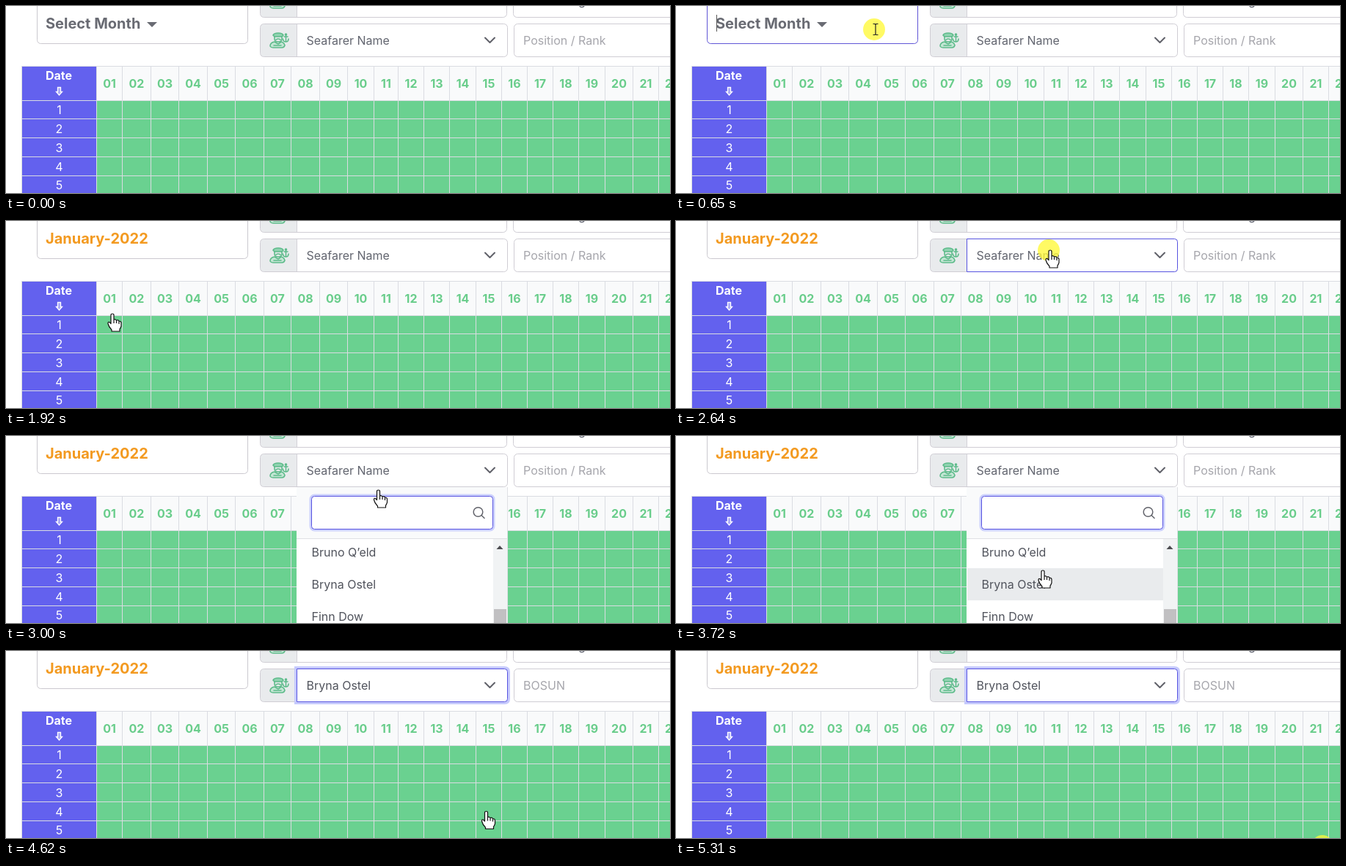
These frames come from a looping animation (905x256 px, 5.41 s). An HTML page:

```html
<!DOCTYPE html>
<html lang="en">
<head>
<meta charset="utf-8">
<title>Crew rest hours</title>
<style>
  html, body { margin: 0; width: 100%; height: 100%; overflow: hidden; background: #fff; }
  svg { display: block; width: 905px; height: 256px; font: 16px Inter, "Open Sans", sans-serif; }
  .b { font-weight: 700; }
  .h { font-weight: 700; font-size: 20px; }
  .mid { text-anchor: middle; }
  .line { fill: none; stroke-linecap: round; stroke-linejoin: round; }
</style>
</head>
<body>
<svg id="stage" viewBox="0 0 905 256">
  <defs>
    <g id="sailor" class="line" stroke="#5dbb8a" stroke-width="1.6">
      <path d="M5 4 Q6 1 12 1 Q18 1 19 4 L17 6 H7 Z" fill="#8fd3b0"/>
      <path d="M7 6 V9 Q7 13 12 13 Q17 13 17 9 V6 M9 10 Q12 8 15 10"/>
      <path d="M1 19 Q1 14 7 13 L12 16 L16 13 Q20 14 21 18 Q20 21 17 21 H5 Q2 21 1 19 Z M6 18 H16" fill="#c4e6d5"/>
      <path d="M22.500 4 V13 M20 6 H25 M18.500 9 Q18.500 13 22.500 13 Q26 13 26 9"/>
      <circle cx="22.500" cy="3" r="1"/>
    </g>
    <path id="chevron" class="line" d="M0 0 L6.500 6.500 L13 0" stroke="#5f6068" stroke-width="2"/>
    <path id="inputBox" d="M396.500 24.500 H679.500 Q683.500 24.500 683.500 28.500 V65.500 Q683.500 69.500 679.500 69.500 H396.500 Z"/>
  </defs>

  <rect id="monthBox" x="42.500" y="-30.500" width="287" height="82" rx="5" fill="#fff"/>
  <g id="pick">
    <text class="h" x="54" y="31" fill="#696b73">Select Month</text>
    <path d="M192 22 H206 L199 29 Z" fill="#696b73"/>
  </g>
  <text id="month" class="h" x="54" y="31" fill="#f39a20">January-2022</text>
  <rect id="caret" x="55" y="12" width="1" height="23" fill="#555"/>

  <g id="fields"></g>
  <use id="ring" href="#inputBox" fill="none" stroke="#c6cafc"/>
  <use id="focus" href="#inputBox" fill="#fff" stroke="#5753e0"/>
  <text id="seafarer" x="409.500" y="53"></text>
  <text id="rank" x="705" y="53" fill="#a6a6ac"></text>
  <use href="#chevron" x="653" y="43.500"/>

  <g id="table"></g>

  <g id="menu">
    <rect x="396" y="70" width="288" height="186" fill="#fff"/>
    <rect x="396" y="70" width="288" height="70" fill="#f9fafb"/>
    <path d="M683.500 70 V256 M396 140.500 H684" stroke="#dfe0e4" fill="none"/>
    <rect x="416.500" y="82.500" width="247" height="45" rx="4" fill="#fff" stroke="#ccd1fc" stroke-width="6"/>
    <rect x="416.500" y="82.500" width="247" height="45" rx="4" fill="#fff" stroke="#5753e0"/>
    <g class="line" stroke="#62636b" stroke-width="1.500">
      <circle cx="643.500" cy="104" r="6.300"/>
      <path d="M648 108.500 L652 112.500"/>
    </g>
    <rect id="hover" x="397" width="267" height="44" fill="#e9ebed"/>
    <g id="names" fill="#50535c"></g>
    <rect x="664" y="141" width="19" height="115" fill="#f1f3f4"/>
    <path d="M668.500 155 L673 150 L677.500 155 Z" fill="#4c4c50"/>
    <rect x="665" y="237" width="17" height="19" fill="#c1c0c2"/>
  </g>

  <circle id="halo" r="15" fill="#fff838" fill-opacity=".78"/>
  <path id="hand" d="M-2 2 Q-2 0 0 0 Q2 0 2 2 V8 Q4 7 5.500 9 Q8 8 9 10 Q12 10 12 12.500 V17 Q11 20 10 21 V24 H-1 V22 Q-5 18 -6 13.500 Q-6 10.500 -4 11.500 L-2 13.500 Z M2 8 V13 M5.500 9 V13 M9 10 V14" fill="#fff" stroke="#111" stroke-width="1.200" stroke-linejoin="round"/>
  <path id="beam" d="M-3.500 -7.500 H-1 L0 -6.500 L1 -7.500 H3.500 M0 -6.500 V6.500 M-3.500 7.500 H-1 L0 6.500 L1 7.500 H3.500" fill="none" stroke="#222" stroke-width="1.200"/>
</svg>

<script>
const LOOP = 5410;
const $ = id => document.getElementById(id);
const show = (id, on) => { $(id).style.display = on ? "" : "none"; };

function add(parent, tag, attrs, text = "") {
  const el = document.createElementNS("http://www.w3.org/2000/svg", tag);
  for (const key in attrs) el.setAttribute(key, attrs[key]);
  el.textContent = text;
  return $(parent).appendChild(el);
}
const rect = (parent, x, y, width, height, fill) =>
  add(parent, "rect", { x, y, width, height, fill });

// Form fields
function field(x, y, w, withIcon) {
  const box = { x: x + .5, y: y + .5, width: w, height: 45, rx: 5 };
  add("fields", "rect", { ...box, fill: "#fff" });
  if (withIcon) {
    add("fields", "path", {
      d: `M${x + 50} ${y + 1} H${x + 5} Q${x + 1} ${y + 1} ${x + 1} ${y + 5} V${y + 41} Q${x + 1} ${y + 45} ${x + 5} ${y + 45} H${x + 50} Z`,
      fill: "#e9ebed"
    });
    rect("fields", x + 50, y, 1, 45, "#d3d1d8");
    add("fields", "use", { href: "#sailor", x: x + 13, y: y + 12 });
  }
  add("fields", "rect", { ...box, fill: "none", stroke: "#cfcdd4" });
}
field(346, -30, 336, true);
field(691, -30, 300);
field(346, 24, 337, true);
field(692, 24, 300);
add("fields", "text", { x: 780, y: -1, fill: "#5f6370" }, "g");

// Date grid
const cols = [123, 158, 197, 235, 274, 312, 351, 388, 427, 465, 501, 534,
  569, 604, 640, 675, 710, 745, 780, 816, 854, 889, 926];
const rows = [129, 154, 180, 206, 232];
rect("table", 22, 82, 101, 174, "#6361ee");
rect("table", 123, 82, 782, 47, "#f9fafb");
rect("table", 123, 129, 782, 127, "#6ad190");
for (const x of cols) rect("table", x, 82, 1, 174, "#dadce2");
for (const y of [82, ...rows]) rect("table", 22, y, 883, 1, "#dadce2");
rect("table", 21, 82, 1, 174, "#dadce2");
cols.slice(0, -1).forEach((x, i) => add("table", "text", {
  class: "b mid", x: (x + cols[i + 1] + 1) / 2, y: 112, fill: "#69cd8b"
}, String(i + 1).padStart(2, "0")));
add("table", "text", { class: "b mid", x: 72, y: 101, fill: "#fff" }, "Date");
add("table", "path", {
  d: "M70.500 111.500 H74.500 V117.500 H76.500 L72.500 122 L68.500 117.500 H70.500 Z",
  fill: "#a9a8f6", stroke: "#fff", "stroke-width": 1.3
});
rows.forEach((y, i) => add("table", "text", {
  class: "mid", x: 72.5, y: 148.4 + 25.75 * i, fill: "#fff"
}, i + 1));

// Seafarer list
const crew = ["Bruno Q’eld", "Bryna Ostel", "Finn Dow"];
crew.forEach((name, i) => add("names", "text", { x: 416.5, y: 165 + 44 * i }, name));

// Pointer waypoints: time, x, y
const path = [
  [90, 640, 215], [280, 440, 115], [470, 300, 40], [650, 272, 32], [840, 272, 32],
  [1380, 160, 122], [1560, 145, 127], [1920, 145, 127], [2100, 190, 118],
  [2460, 470, 52], [2640, 510, 40], [2820, 510, 40], [3540, 500, 176],
  [3720, 500, 184], [3900, 499, 188], [4080, 489, 193], [4260, 489, 193],
  [4980, 820, 246], [5310, 883, 267]
];
function pointer(t) {
  const i = Math.max(1, path.findIndex(p => p[0] >= t));
  const [t0, x0, y0] = path[i - 1], [t1, x1, y1] = path[i];
  const k = Math.max(0, (t - t0) / (t1 - t0));
  return [x0 + (x1 - x0) * k, y0 + (y1 - y0) * k];
}

const ticks = [0, 90, 180, 280, 470, 650, 840];
for (let t = 1020; t <= 5160; t += 180) ticks.push(t);
ticks.push(5250, 5310);
const clicks = [650, 1560, 2640, 3900, 5310];

function draw(t) {
  const within = (a, b) => t >= a && t < b;
  const [x, y] = pointer(t);
  const chosen = t >= 4080, open = within(2820, 4080), editing = within(650, 1740);

  $("monthBox").setAttribute("stroke", editing ? "#5f55d6" : "#cbc9cf");
  show("pick", t < 1740);
  show("month", t >= 1740);
  show("caret", within(650, 1020));

  $("seafarer").textContent = chosen ? crew[1] : "Seafarer Name";
  $("seafarer").setAttribute("fill", chosen ? "#50535c" : "#62656f");
  $("rank").textContent = chosen ? "BOSUN" : "Position / Rank";
  show("focus", within(2640, 2820) || chosen);
  show("ring", chosen);
  $("ring").setAttribute("stroke-width", t < 4440 ? 3 : 7);

  show("menu", open);
  const row = Math.floor((y - 137) / 44);
  show("hover", row >= 0);
  $("hover").setAttribute("y", Math.max(141, 137 + 44 * row));

  const beam = within(470, 1020);
  show("beam", beam);
  show("hand", t >= 90 && !beam);
  show("halo", clicks.includes(t));
  const at = `translate(${x} ${y})`;
  $("beam").setAttribute("transform", at);
  $("hand").setAttribute("transform", at);
  $("halo").setAttribute("transform", `translate(${x - 2} ${y})`);
}

const start = performance.now();
let last = -1;
function loop() {
  const now = (performance.now() - start) % LOOP;
  const t = ticks.filter(v => v <= now).pop();
  if (t !== last) draw(last = t);
  requestAnimationFrame(loop);
}
loop();
</script>
</body>
</html>
```
